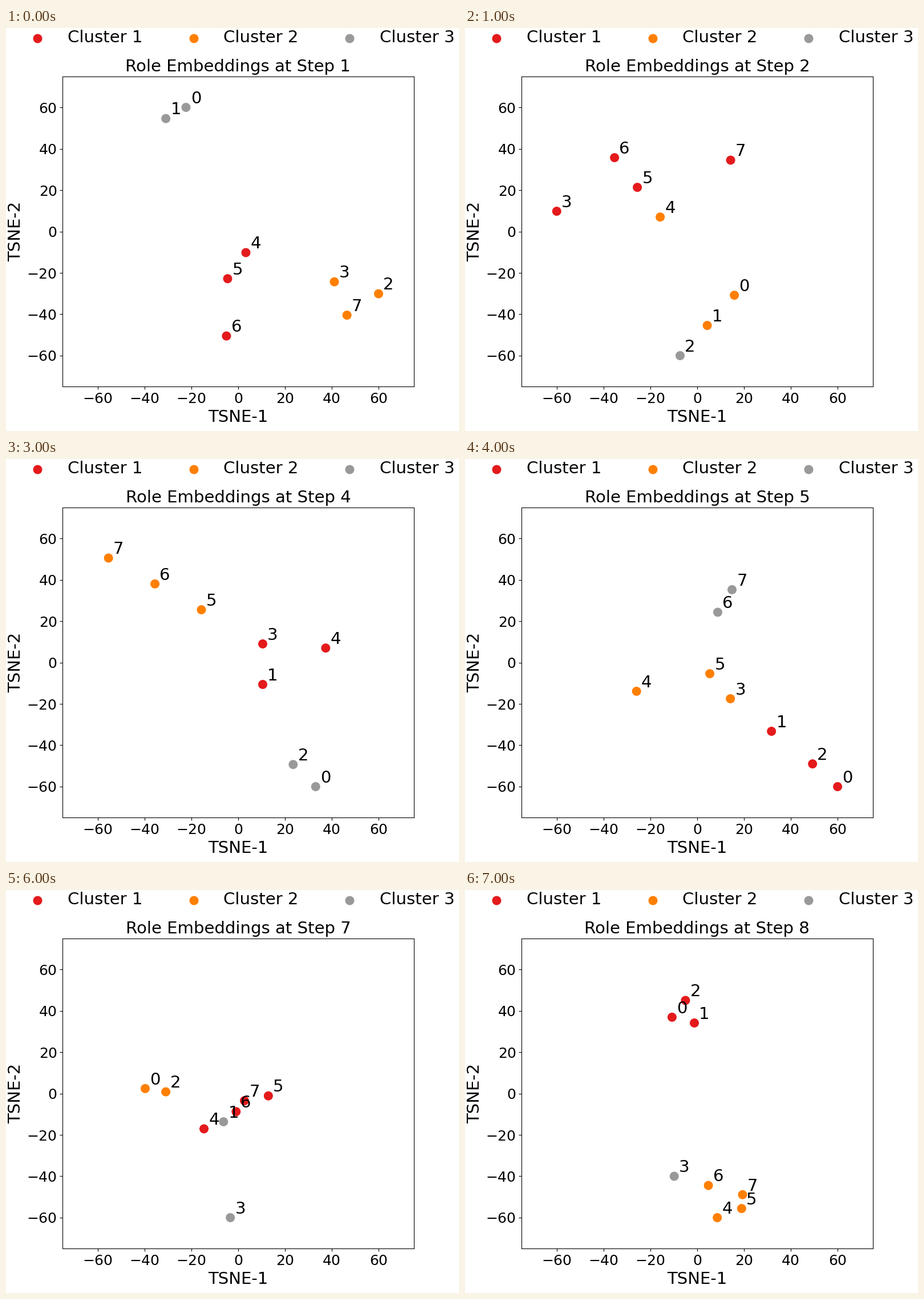
Write a matplotlib script that moves like this. It is 794x706 px and loops after 8000 ms.

```python
import matplotlib.pyplot as plt
import numpy as np
from matplotlib.animation import FuncAnimation

W, H, DPI = 794, 706, 100
COLORS = {"R": "#e41a1c", "O": "#ff7f00", "G": "#999999"}
BIG, SMALL = 21, 18
DOT = 110
ROLES = 8
LIMIT = 60
ARC = 0.7


def path(roles, start, end=0, bow=0):
    """Space roles evenly from start to end, bowed sideways; x + yj."""
    t = np.linspace(0, 1, len(roles))
    spots = start + (end - start) * (t + 4j * bow * t * (1 - t))
    return {int(role): spot for role, spot in zip(roles, spots)}


def layout(*paths):
    spots = {}
    for p in paths:
        spots.update(p)
    return np.array([spots[role] for role in range(ROLES)])


def between(a, b):
    """Halfway layout, scaled so that its widest coordinate is LIMIT."""
    mid = (a + b) / 2
    return mid * LIMIT / max(abs(mid.real).max(), abs(mid.imag).max())


first = layout(path("10", -30.9 + 54.6j, -22.3 + 60j),
               path("45", 3.3 - 10.2j, -4.5 - 22.8j),
               path("6", -5 - 50.5j),
               path("273", 60 - 30.1j, 41.1 - 24.3j, ARC))
second = layout(path("654", -35.3 + 35.7j, -15.8 + 7j),
                path("012", 15.9 - 30.8j, -7.3 - 60j),
                path("3", -60 + 9.8j),
                path("7", 14.3 + 34.5j))
fourth = layout(path("765", -55.4 + 50.5j, -15.7 + 25.5j),
                path("31", 10.5 + 9j, 10.5 - 10.6j),
                path("4", 37.4 + 7j),
                path("20", 23.5 - 49.3j, 33.1 - 60j))
fifth = layout(path("312", 14.2 - 17.5j, 49.3 - 49j),
               path("0", 60 - 60j),
               path("54", 5.4 - 5.4j, -25.9 - 13.9j),
               path("67", 8.8 + 24.3j, 14.9 + 35.2j))
sixth = layout(path("475", -31.7 + 33j, 1.4 + 53.8j),
               path("6", -6.2 + 30.6j),
               path("02", -52.1 - 33.1j, -43.9 - 43.7j),
               path("13", -8.7 - 55.7j, 4.5 - 54.9j))
eighth = layout(path("102", -1.2 + 34.1j, -5 + 45j, ARC),
                path("367", -9.8 - 40j, 19.4 - 48.9j),
                path("45", 8.6 - 60j, 19 - 55.6j))

# Cluster of each role, then the positions.
STEPS = [
    ("GGOORRRO", first),
    ("OOGRORRR", second),
    ("GRGRROOO", between(second, fourth)),
    ("GRGRROOO", fourth),
    ("RRROOOGG", fifth),
    ("OGOGRRRR", sixth),
    ("OGOGRRRR", between(sixth, eighth)),
    ("RRRGOOOO", eighth),
]

plt.rcParams["font.family"] = "DejaVu Sans"
fig, ax = plt.subplots(figsize=(W / DPI, H / DPI), dpi=DPI)

ticks = range(-LIMIT, LIMIT + 1, 20)
ax.set(xlim=(-75, 75), ylim=(-75, 75), xticks=ticks, yticks=ticks)
ax.tick_params(labelsize=SMALL)
ax.set_xlabel("TSNE-1", fontsize=BIG)
ax.set_ylabel("TSNE-2", fontsize=BIG)
title = ax.set_title("", fontsize=BIG)

# Legend row in stage pixels, above the axes.
key = fig.add_axes([0, 0, 1, 1])
key.set(xlim=(0, W), ylim=(H, 0))
key.axis("off")
for i, color in enumerate(COLORS.values()):
    x = 55.3 + 273.5 * i
    key.scatter(x, 17.5, s=DOT, color=color)
    key.text(x + 52.5, 25, f"Cluster {i + 1}", fontsize=BIG)

dots = ax.scatter([0] * ROLES, [0] * ROLES, s=DOT)
labels = [ax.text(0, 0, str(role), fontsize=BIG) for role in range(ROLES)]


def update(step):
    clusters, spots = STEPS[step]
    title.set_text(f"Role Embeddings at Step {step + 1}")
    dots.set_offsets(np.column_stack([spots.real, spots.imag]))
    dots.set_color([COLORS[c] for c in clusters])
    for label, spot in zip(labels, spots):
        label.set_position((spot.real + 2, spot.imag + 2))
    return [title, dots, *labels]


anim = FuncAnimation(fig, update, frames=len(STEPS), init_func=lambda: update(0),
                     interval=1000, repeat=True, repeat_delay=0)
plt.show()
```
